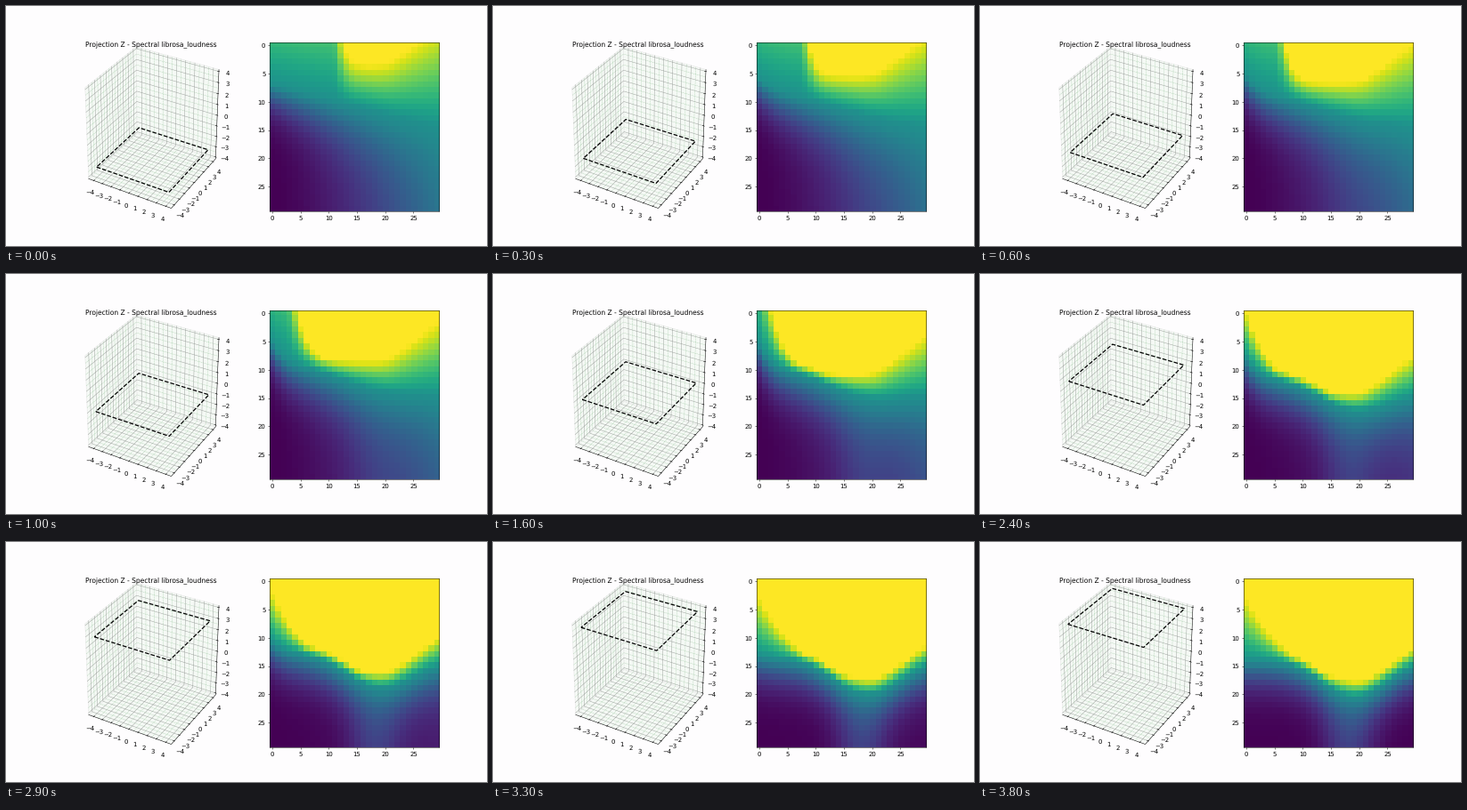
Recreate the animation shown at these times as a matplotlib script. Size 540 by 270 pixels, loop 3900 ms.

```python
import numpy as np
import matplotlib.pyplot as plt
from matplotlib.animation import FuncAnimation
from matplotlib.patches import Polygon

W, H, DPI = 540, 270, 45
FRAMES, INTERVAL = 39, 100
N = 30
FIRST_LEVEL, LAST_LEVEL = 3, N - 1
LABEL_SIZE = 11

plt.rcParams.update({"font.family": "DejaVu Sans", "text.hinting": "none",
                     "xtick.labelsize": LABEL_SIZE, "ytick.labelsize": LABEL_SIZE})
fig = plt.figure(figsize=(W / DPI, H / DPI), dpi=DPI, facecolor="#fefdfe")
stage = fig.add_axes([0, 0, 1, 1])
stage.set(xlim=(0, W), ylim=(H, 0))
stage.axis("off")

# ---- perspective box, in units where the axis limits are +-0.5 ----
PANE = 0.5 * 25 / 24
LABEL = PANE + 0.0722
TICK_OUT, TICK_IN = 0.1 / 12, 0.2 / 12
XY_UNIT, Z_UNIT = 1 / 8.8, 1 / 8
ELEV, AZIM, DIST = np.radians(30), np.radians(-60), 10
EYE = np.array([np.cos(ELEV) * np.cos(AZIM), np.cos(ELEV) * np.sin(AZIM), np.sin(ELEV)])
RIGHT = np.array([-np.sin(AZIM), np.cos(AZIM), 0])
UP = np.cross(EYE, RIGHT)


def project(points):
    p = np.atleast_2d(np.asarray(points, float))
    scale = DIST / (DIST - p @ EYE)
    return np.column_stack([165.2 + 102.8 * scale * (p @ RIGHT),
                            133.5 - 112.4 * scale * (p @ UP)])


def line3d(points, **style):
    xy = project(points)
    return stage.plot(xy[:, 0], xy[:, 1], **style)[0]


def label3d(point, value):
    x, y = project(point)[0]
    stage.text(x, y, str(value).replace("-", "\u2212"), size=LABEL_SIZE,
               ha="center", va="top")


def grid(values, **style):
    for k in values:
        a, c = k * XY_UNIT, k * Z_UNIT
        line3d([(a, -PANE, -PANE), (a, PANE, -PANE), (a, PANE, PANE)], **style)
        line3d([(PANE, a, -PANE), (-PANE, a, -PANE), (-PANE, a, PANE)], **style)
        line3d([(-PANE, -PANE, c), (-PANE, PANE, c), (PANE, PANE, c)], **style)


def draw_box():
    q = PANE
    panes = [[(-q, -q, -q), (q, -q, -q), (q, q, -q), (-q, q, -q)],
             [(-q, -q, -q), (-q, q, -q), (-q, q, q), (-q, -q, q)],
             [(-q, q, -q), (q, q, -q), (q, q, q), (-q, q, q)]]
    for pane in panes:
        stage.add_patch(Polygon(project(pane), fc="#f5f9f5", ec="#e6e6e6", lw=0.8))

    grid(np.arange(-3.5, 4), color="#4c9a55", lw=0.6, alpha=0.5, ls="--")
    grid(range(-4, 5), color="#858b86", lw=0.75, alpha=0.8)

    axis = dict(color="black", lw=0.8)
    line3d([(-q, -q, -q), (q, -q, -q), (q, q, -q), (q, q, q)], **axis)
    for k in range(-4, 5):
        a, c = k * XY_UNIT, k * Z_UNIT
        line3d([(a, -q - TICK_OUT, -q), (a, -q + TICK_IN, -q)], **axis)
        line3d([(q + TICK_OUT, a, -q), (q - TICK_IN, a, -q)], **axis)
        line3d([(q + TICK_OUT, q, c), (q - TICK_IN, q, c)], **axis)
        label3d((a, -LABEL, -LABEL), k)
        label3d((LABEL, a, -LABEL), k)
        label3d((LABEL, LABEL, c), k)


draw_box()
stage.text(162.6, 45.3, "Projection Z - Spectral librosa_loudness",
           size=12, ha="center", va="baseline")


def plane_at(level):
    a = 4 * XY_UNIT
    z = (-4 + 8 * level / (N - 1)) * Z_UNIT
    return project([(-a, -a, z), (a, -a, z), (a, a, z), (-a, a, z), (-a, -a, z)])


plane, = stage.plot([], [], "k--", lw=2)


# ---- loudness field ----
def mix(a, b, t):
    return a + (b - a) * t


def bump(x, centre, width):
    return np.exp(-((x - centre) / width) ** 2)


def field_at(level):
    s = (level - FIRST_LEVEL) / (LAST_LEVEL - FIRST_LEVEL)
    late = s ** 1.3
    x = np.arange(N)
    y = x[:, None]

    # Depth of the half-loud contour: a slope that turns into a basin.
    half = mix(7 + 0.26 * x, 14 + 6.5 * bump(x, 19, 8), late)
    half -= 4 * np.exp(-x / 2) * np.sin(np.pi * s)

    # Edge of the loud area: steep on the left, a gentle ramp on the right.
    left = -3 + 15.5 * np.exp(-2.4 * s)
    rise = 1 - np.exp(-(x - left) / (1 + 7.5 * s ** 2))
    loud = (3.7 + 16 * s) * rise - 0.8 * np.logaddexp(0, x - 20.5)
    loud = np.clip(loud, -15, half - 1.7)

    # Quiet area below: fades to a floor that narrows into a ridge.
    floor = mix(0.36 * (x / (N - 1)) ** 1.5, 0.18 * bump(x, 18, 4.5), late)
    reach = 4 + 0.2 * x * (1 - s)
    fade = np.exp(-(np.maximum(y - half, 0) / reach) ** 1.3)
    upper = 1 - 0.5 * (y - loud) / (half - loud)
    return np.where(y < half, upper, floor + (0.5 - floor) * fade)


heat_ax = fig.add_subplot(1, 2, 2)
heat = heat_ax.imshow(np.zeros((N, N)), cmap="viridis", vmin=0, vmax=1,
                      interpolation="nearest")


def update(frame):
    level = min(LAST_LEVEL, int(FIRST_LEVEL + 0.75 * (frame + 1)))
    xy = plane_at(level)
    plane.set_data(xy[:, 0], xy[:, 1])
    heat.set_data(field_at(level))
    return plane, heat


anim = FuncAnimation(fig, update, frames=FRAMES, interval=INTERVAL,
                     repeat=True, repeat_delay=0)
plt.show()
```
